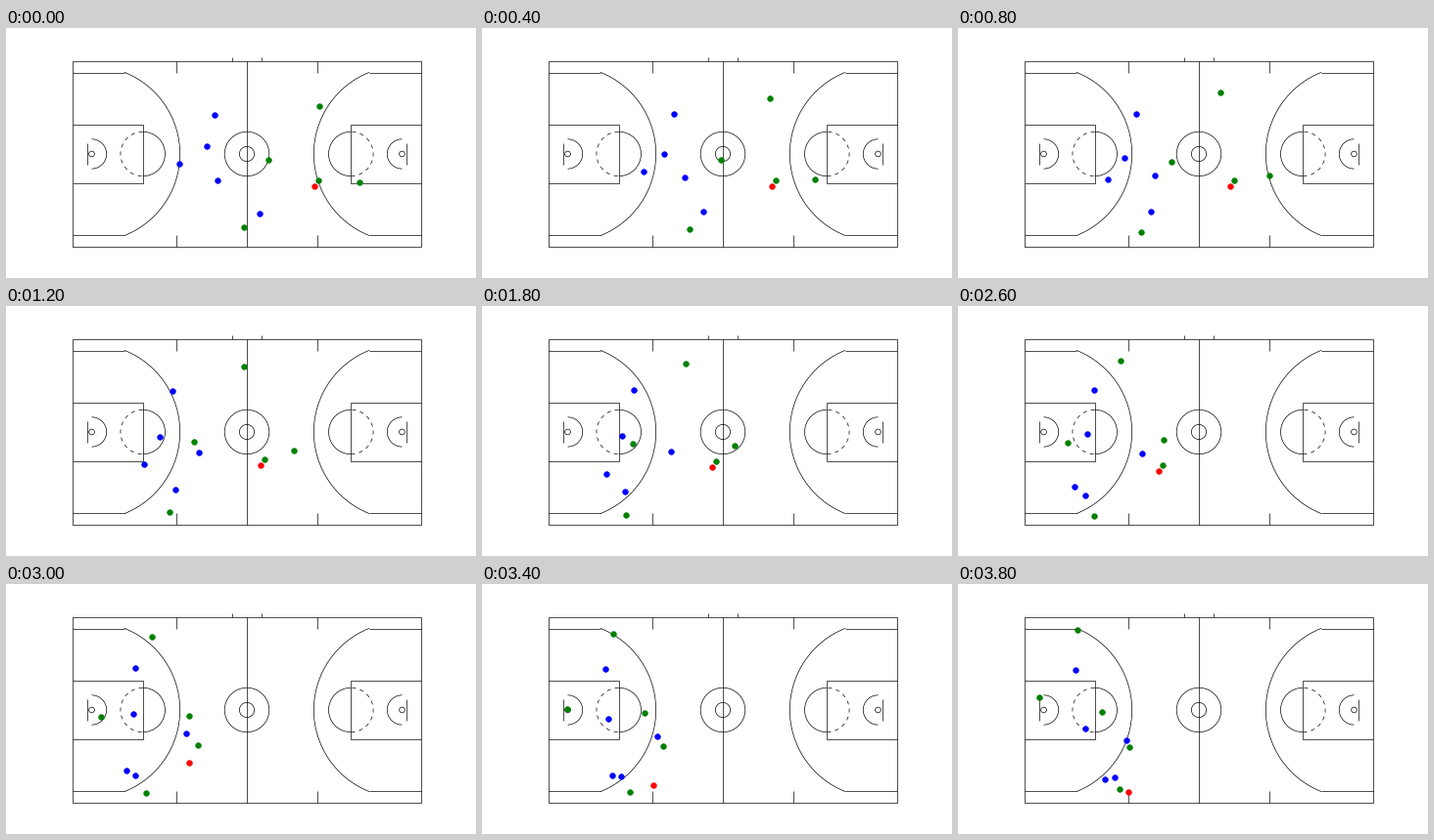
Write a matplotlib script that moves like this. It is 480 px wide and 256 px high and loops after 4 s.

```python
import numpy as np
import matplotlib.pyplot as plt
from matplotlib.animation import FuncAnimation
from matplotlib.patches import Arc

FRAMES, STEP = 20, 200
W, H, DPI = 480, 256, 80
PX = 72 / DPI  # one pixel in points
LINE = 0.69 * PX

fig, court = plt.subplots(figsize=(W / DPI, H / DPI), dpi=DPI, facecolor="white")
fig.subplots_adjust(left=0.125, right=0.9, bottom=0.1112, top=0.8812)
court.set(xlim=(-2, 96), ylim=(-1, 51))
court.axis("off")


# Court markings, in feet
def line(xs, ys):
    court.plot(xs, ys, color="black", lw=LINE, solid_capstyle="butt")


def arc(x, r, start=0, end=360, style="-"):
    court.add_patch(Arc((x, 25), 2 * r, 2 * r, theta1=start, theta2=end,
                        lw=LINE, ls=style, color="black"))


def half_court(mirror):
    def fx(x):
        return 94 - x if mirror else x

    def side_arc(x, r, start, end, style="-"):
        if mirror:
            start, end = 180 - end, 180 - start
        arc(fx(x), r, start, end, style)

    reach = np.degrees(np.arctan2(22, 14 - 5.25))
    side_arc(5.25, 23.75, -reach, reach)
    for y in (3, 47):
        line([fx(0), fx(14)], [y, y])
    line([fx(0), fx(19), fx(19), fx(0)], [17, 17, 33, 33])
    side_arc(19, 6, -90, 90)
    side_arc(19, 6, 90, 270, (0, (6, 6)))
    side_arc(5.25, 4, -90, 90)
    arc(fx(5.25), 0.75)
    line([fx(4), fx(4)], [22, 28])
    for y in (0, 47):
        line([fx(28), fx(28)], [y, y + 3])
    line([fx(43), fx(43)], [50, 51])


line([0, 94, 94, 0, 0], [0, 0, 50, 50, 0])
line([47, 47], [0, 50])
arc(47, 6)
arc(47, 2)
half_court(False)
half_court(True)

# Moving dots, in stage pixels
stage = fig.add_axes([0, 0, 1, 1])
stage.set(xlim=(0, W), ylim=(H, 0))
stage.axis("off")

T = np.arange(FRAMES)
KEYS = (0, 6, 13, 19)


def run(*points):
    """Cubic path through four points."""
    return np.array([np.polyval(np.polyfit(KEYS, axis, 3), T)
                     for axis in zip(*points)])


def ease(start, end):
    s = np.clip((T - start) / (end - start), 0, 1)
    return s * s * (3 - 2 * s)


defence = [
    run((213, 89), (170, 87), (139, 86), (120, 88)),
    run((205, 121), (157, 134), (132, 131), (130, 148)),
    run((177, 139), (141, 162), (119, 185), (150, 200)),
    run((216, 156), (197, 150), (188, 151), (172, 160)),
    run((259, 190), (173, 188), (130, 194), (160, 198)),
]
dribbler = run((319, 156), (264, 157), (209, 163), (175, 167))
offence = [
    run((320, 80), (243, 62), (166, 56), (122, 47)),
    run((268, 135), (192, 139), (112, 140), (83, 116)),
    run((243, 204), (167, 211), (139, 215), (165, 210)),
    run((361, 158), (294, 148), (210, 137), (147, 131)),
    dribbler,
]

# The ball stays beside the dribbler, then is passed to the sideline
carried = dribbler + np.array([[-4], [6]])
catch = np.array([[174], [213]])
ball = carried + (catch - carried) * ease(13, 18.5)

dots = []
for color, paths in (("blue", defence), ("green", offence), ("red", [ball])):
    for path in paths:
        marker, = stage.plot([], [], "o", color=color, ms=5.6 * PX, mew=0.7 * PX)
        dots.append((marker, np.round(path) + 0.01))


def update(n):
    for marker, path in dots:
        marker.set_data(path[0, n:n + 1], path[1, n:n + 1])
    return [marker for marker, _ in dots]


anim = FuncAnimation(fig, update, frames=FRAMES, interval=STEP,
                     init_func=lambda: update(0), repeat=True, repeat_delay=0)
plt.show()
```
